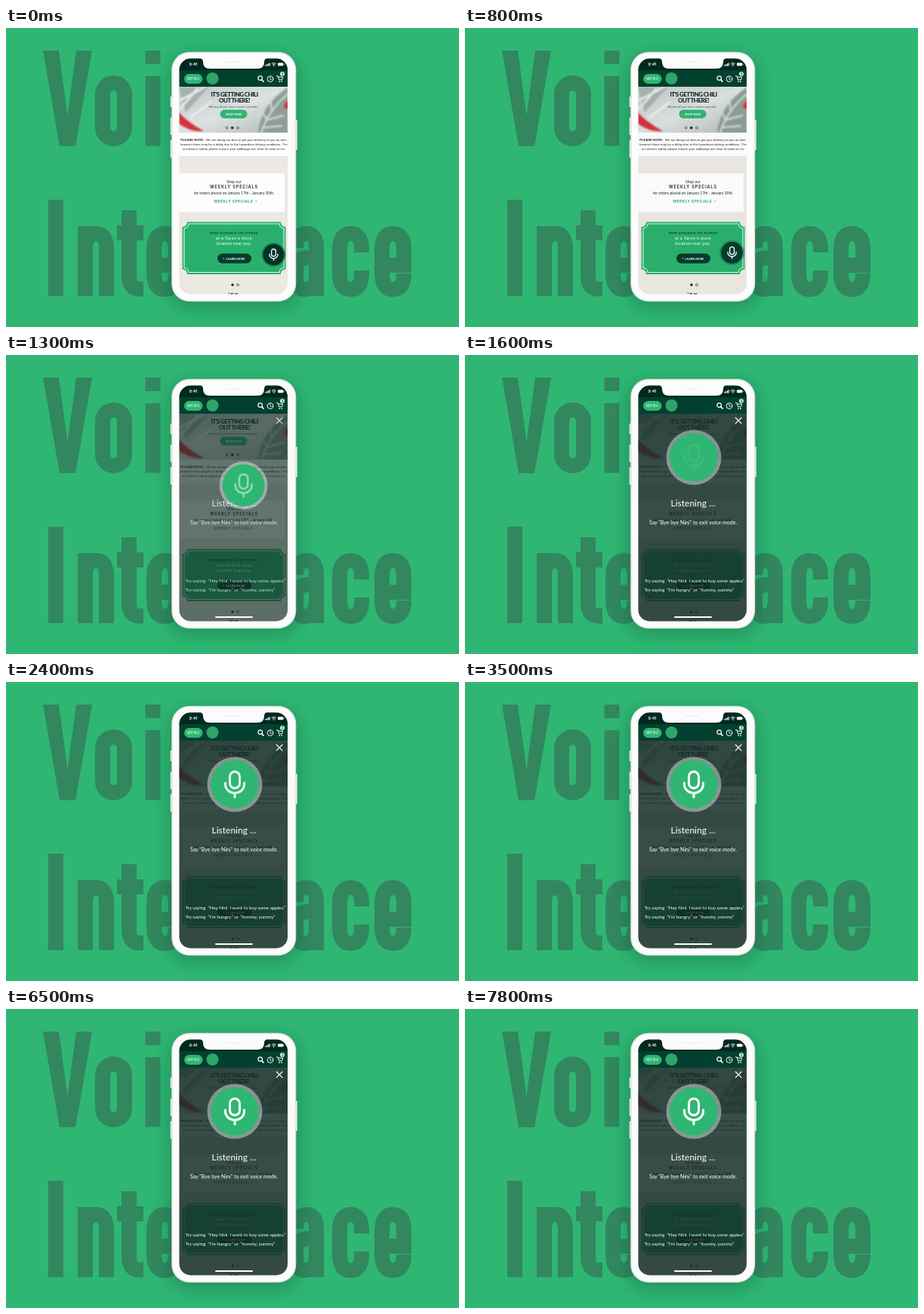
Write an HTML page that moves like this. It is 600 by 397 pixels and loops after 8 s.

```html
<!DOCTYPE html>
<html lang="en">
<head>
<meta charset="utf-8">
<title>Voice Interface</title>
<style>
  html, body { margin: 0; width: 100%; height: 100%; overflow: hidden; background: #2fb673; }
  svg { display: block; width: 100vw; height: 100vh; }
  text { font-family: Lato, "Open Sans", sans-serif; }
  .mid { text-anchor: middle; }
  .lettering { fill: none; stroke: #32875f; stroke-width: 20; }
  .heavy { font-family: Roboto, sans-serif; font-weight: 800; }
  .note { font-family: "Liberation Sans", Arial, sans-serif; font-size: 4.25px; }
  .wide { font-family: Inter, sans-serif; font-weight: 600; }
  .line { fill: none; stroke: #fff; }
</style>
</head>
<body>
<svg viewBox="0 0 600 397" preserveAspectRatio="none">
  <defs>
    <filter id="shadow" x="-40%" y="-20%" width="180%" height="140%"><feGaussianBlur stdDeviation="11"/></filter>
    <filter id="soft" x="-30%" y="-30%" width="160%" height="160%"><feGaussianBlur stdDeviation=".8"/></filter>
    <clipPath id="screen"><rect x="229.5" y="40.5" width="143.5" height="313" rx="15"/></clipPath>
    <clipPath id="hero"><rect x="229" y="78" width="145" height="61"/></clipPath>
    <clipPath id="clipped"><rect x="260" y="271" width="90" height="2.5"/></clipPath>
    <linearGradient id="frost" x2="1" y2="1">
      <stop stop-color="#bcc5c4"/><stop offset=".5" stop-color="#dde2e1"/><stop offset="1" stop-color="#aeb8b5"/>
    </linearGradient>
    <g id="mic" fill="none" stroke="#fff" stroke-width="3" stroke-linecap="round">
      <rect x="-6.5" y="-17" width="13" height="22" rx="6.5"/>
      <path d="M-12.5-2V0A12.5 11.5 0 0 0 12.5 0V-2M0 11.5V17"/>
    </g>
    <path id="letter-e" d="M10-41H39V-62Q39-83 24.5-83T10-62V-30Q10-9 24.5-9T39-30"/>
  </defs>

  <rect width="600" height="397" fill="#2fb673"/>

  <g class="lettering" role="img" aria-label="Voice Interface">
    <path d="M49 30H70L81.500 116L93 30H114L92 157H71Z" fill="#32875f" stroke="none"/>
    <rect x="128" y="73" width="29" height="74" rx="14.5"/>
    <path d="M194.500 156.500V64M194.500 48V30"/>
    <g transform="translate(0 356)">
      <path d="M66 0V-128"/>
      <path transform="translate(95)" d="M10 0V-93M10-62Q10-83 25-83Q38-83 38-62V0"/>
      <path transform="translate(147)" d="M16-114V-27Q16-9.500 29-9.500H35M0-84H35"/>
      <use href="#letter-e" x="186"/>
      <path transform="translate(374)" d="M10-64Q10-83 24-83T37-62V0M37-51H26Q10-51 10-35V-27Q10-9 22-9Q37-9 37-30"/>
      <path transform="translate(432)" d="M39-58V-62Q39-83 24.500-83T10-62V-30Q10-9 24.500-9T39-30V-34"/>
      <use href="#letter-e" x="488"/>
    </g>
  </g>

  <rect x="215" y="36" width="174" height="336" rx="28" fill="#0b5a38" opacity=".38" filter="url(#shadow)"/>
  <path d="M219 91V105M219 119V142M219 149V172M384.500 122V162" stroke="#e3e8e5" stroke-width="2.500"/>
  <rect x="220" y="32.500" width="163.500" height="330" rx="23" fill="#fbfcfb" stroke="#e0e5e2" stroke-width="1.500"/>

  <g clip-path="url(#screen)">
    <rect x="229" y="40" width="145" height="314" fill="#ece8e2"/>

    <g clip-path="url(#hero)">
      <rect x="229" y="78" width="145" height="61" fill="url(#frost)"/>
      <g filter="url(#soft)">
        <path d="M229 79H268L238 112Z" fill="#a7b2af"/>
        <path d="M334 139Q337 103 373 79V139Z" fill="#8e9d98"/>
        <path d="M338 139Q348 108 373 88M345 121L336 106M352 111L350 92M346 122L368 116M341 132L366 130" fill="none" stroke="#d5dcda" stroke-width="2"/>
        <path d="M230 96Q247 88 264 78M230 108L254 80M244 119L272 98" fill="none" stroke="#eef1f0" stroke-width="2.500"/>
        <path d="M229 112Q239 124 262 137Q243 138 229 127Z" fill="#d3323a"/>
        <path d="M368 106Q368 99 374 96V108Z" fill="#d3323a"/>
      </g>
      <g class="mid heavy" fill="#12231e" font-size="8" letter-spacing="-.55">
        <text x="302.500" y="90.700">IT'S GETTING CHILI</text>
        <text x="302.500" y="99.300">OUT THERE!</text>
      </g>
      <text class="mid" x="301" y="105.500" font-size="3.5" fill="#38554b">We have all your winter warmer essentials.</text>
      <rect x="283.500" y="108.500" width="36" height="11.500" rx="5.750" fill="#2fb673"/>
      <text class="mid wide" x="301.500" y="115.700" font-size="3.8" fill="#fff">SHOP NOW</text>
      <g fill="none" stroke="#24332e" stroke-width=".7">
        <circle cx="292.5" cy="132.5" r="1.5"/><circle cx="299.7" cy="132.5" r="1.5" fill="#14241f"/><circle cx="307" cy="132.5" r="1.5"/>
      </g>
    </g>

    <rect x="229" y="139" width="145" height="31" fill="#fdfdfd"/>
    <g class="mid" fill="#222">
      <text class="note" x="302" y="149.800"><tspan font-weight="700">PLEASE NOTE:</tspan>&#160; We are doing our best to get your delivery to you on time,</text>
      <text class="note" x="302" y="156">however there may be a delay due to the hazardous driving conditions.&#160; For</text>
      <text class="note" x="302" y="162.200">our drivers' safety please ensure your walkways are clear of snow or ice.</text>
    </g>

    <rect x="229" y="193" width="140" height="51" fill="#fdfdfd"/>
    <g class="mid" fill="#1c2925">
      <text x="302" y="206" font-size="5">Shop our</text>
      <text class="wide" x="302" y="213.3" font-size="5.6" letter-spacing=".8">WEEKLY SPECIALS</text>
      <text x="302" y="221" font-size="4.95">for orders placed on January 17th - January 30th.</text>
      <text class="wide" x="304" y="231.5" font-size="5" letter-spacing=".35" fill="#2fb673" style="font-weight:700">WEEKLY SPECIALS &#160;›</text>
    </g>

    <path d="M240 257.500H364A6 6 0 0 0 370.500 264V320.500A6 6 0 0 0 364 327H240A6 6 0 0 0 233.500 320.500V264A6 6 0 0 0 240 257.500Z" fill="#29b06c"/>
    <path d="M242 260H362A6.500 6.500 0 0 0 368 266V318.500A6.500 6.500 0 0 0 362 324.500H242A6.500 6.500 0 0 0 236 318.500V266A6.500 6.500 0 0 0 242 260Z" fill="none" stroke="#dff3e8" stroke-width="1.100"/>
    <g class="mid" font-size="4.8">
      <g clip-path="url(#clipped)"><text class="wide" x="302" y="274" letter-spacing=".3" fill="#103d2c">Now available for pickup</text></g>
      <text class="wide" x="302" y="281.2" letter-spacing=".45" fill="#e5f6ed">at a Tarvo's store</text>
      <text class="wide" x="302" y="288" letter-spacing=".3" fill="#e5f6ed">location near you.</text>
    </g>
    <rect x="280" y="299.5" width="45" height="13" rx="6.5" fill="#023c2f"/>
    <text class="mid wide" x="304" y="307.5" font-size="3.9" fill="#fff">LEARN MORE</text>
    <circle cx="288" cy="306" r="1.1" fill="#2fb673"/>
    <circle cx="300" cy="341" r="1.7" fill="#14241f"/>
    <circle cx="307" cy="341" r="1.5" fill="none" stroke="#24332e" stroke-width=".7"/>
    <text class="mid heavy" x="302" y="356.500" font-size="7" letter-spacing="1.500" fill="#14241f">'EK</text>

    <rect id="shade" x="229" y="78" width="145" height="276" fill="#122c26"/>

    <rect x="229" y="40" width="145" height="17" fill="#01291f"/>
    <rect x="229" y="56" width="145" height="22" fill="#02402f"/>
    <text class="wide" x="242.5" y="50.3" font-size="5.4" fill="#fff">9:41</text>
    <path d="M343.8 50.5V49M345.6 50.5V48.2M347.4 50.5V47.2M349.2 50.5V46.2" stroke="#fff" stroke-width="1.2"/>
    <path class="line" d="M351.8 47.5Q354.8 45 357.8 47.5M353 49Q354.8 47.5 356.6 49" stroke-width=".9"/>
    <circle cx="354.8" cy="50.2" r=".7" fill="#fff"/>
    <rect x="360" y="46.3" width="7.2" height="4" rx="1" fill="#fff"/>
    <path d="M368 47.5V49.2" stroke="#fff" stroke-width=".8"/>

    <rect x="236" y="61" width="24.5" height="13" rx="6.5" fill="#2fb673"/>
    <text class="mid wide" x="248.5" y="69.3" font-size="5" letter-spacing=".5" fill="#fff" style="font-weight:400">MENU</text>
    <circle cx="273.5" cy="67" r="8" fill="#2fa468"/>
    <g transform="translate(0 -.4)">
      <g class="line" stroke-width="1.2" stroke-linecap="round">
        <circle cx="336.7" cy="67" r="2.8"/><path d="M338.9 69.3L341 71.5" stroke-width="1.6"/>
        <circle cx="350" cy="68" r="3.8" stroke-width="1"/><path d="M350 65.7V68.2L351.7 69" stroke-width=".9"/>
        <path d="M358.5 64.2H360.2L361.6 69.2H365.6L366.7 65.5H360.8" stroke-width="1"/>
      </g>
      <circle cx="362.2" cy="71.5" r=".9" fill="#fff"/><circle cx="365.2" cy="71.5" r=".9" fill="#fff"/>
      <circle cx="366" cy="61.5" r="3" fill="#c9eedb"/>
      <text class="mid wide" x="366" y="63" font-size="4.2" fill="#02402f">3</text>
    </g>

    <g id="panel" fill="#fff">
      <path class="line" d="M358 83L366.4 91.4M366.4 83L358 91.4" stroke-width="1.2"/>
      <text class="mid" x="302" y="200.8" font-size="12">Listening ...</text>
      <text class="mid" x="302" y="225.3" font-size="7">Say “Bye bye Nini” to exit voice mode.</text>
      <g font-size="6.2">
        <text x="237.5" y="302.3">Try saying &#160;“Hey Nini. I want to buy some apples.”</text>
        <text x="237.5" y="314.3">Try saying &#160;“I'm hungry” or “Yummy, yummy”</text>
      </g>
    </g>
    <rect id="home" x="277" y="347" width="50" height="2" rx="1" fill="#fff"/>

    <g id="button">
      <circle id="halo" r="36.5"/>
      <circle id="disc" r="32"/>
      <use id="icon" href="#mic"/>
    </g>
  </g>

  <path d="M255 39.5Q261 40 261 45Q261 54 270 54H333Q342 54 342 45Q342 40 348 39.5Z" fill="#fbfcfb"/>
  <rect x="291" y="44.5" width="19" height="1.8" rx=".9" fill="#eef1ef"/>
</svg>

<script>
  const LOOP = 8000;
  const el = id => document.getElementById(id);
  const [shade, panel, home, button, halo, disc, icon] =
    ["shade", "panel", "home", "button", "halo", "disc", "icon"].map(el);

  const mix = (a, b, p) => a + (b - a) * p;
  const blend = (a, b, p) => `rgb(${a.map((v, i) => Math.round(mix(v, b[i], p)))})`;
  const ease = (t, from, to) => {
    const p = Math.min(1, Math.max(0, (t - from) / (to - from)));
    return p * p * (3 - 2 * p);
  };

  function draw(t) {
    const open = ease(t, 740, 1550);
    const tint = ease(t, 740, 1110);
    const glyph = 1 - 0.95 * (ease(t, 900, 1640) - ease(t, 1750, 2600));

    shade.setAttribute("opacity", 0.84 * open);
    panel.setAttribute("opacity", open);
    home.setAttribute("opacity", tint);
    button.setAttribute("transform",
      `translate(${mix(354.5, 303, open)} ${mix(301, 136, open)}) scale(${mix(0.44, 1, open)})`);
    halo.setAttribute("fill", blend([0, 60, 45], [255, 255, 255], tint));
    halo.setAttribute("opacity", mix(0.35, 0.42, tint));
    disc.setAttribute("fill", blend([2, 50, 40], [47, 182, 115], tint));
    icon.setAttribute("opacity", glyph);
  }

  const start = performance.now();
  function tick() {
    draw((performance.now() - start) % LOOP);
    requestAnimationFrame(tick);
  }
  draw(0);
  requestAnimationFrame(tick);
</script>
</body>
</html>
```
